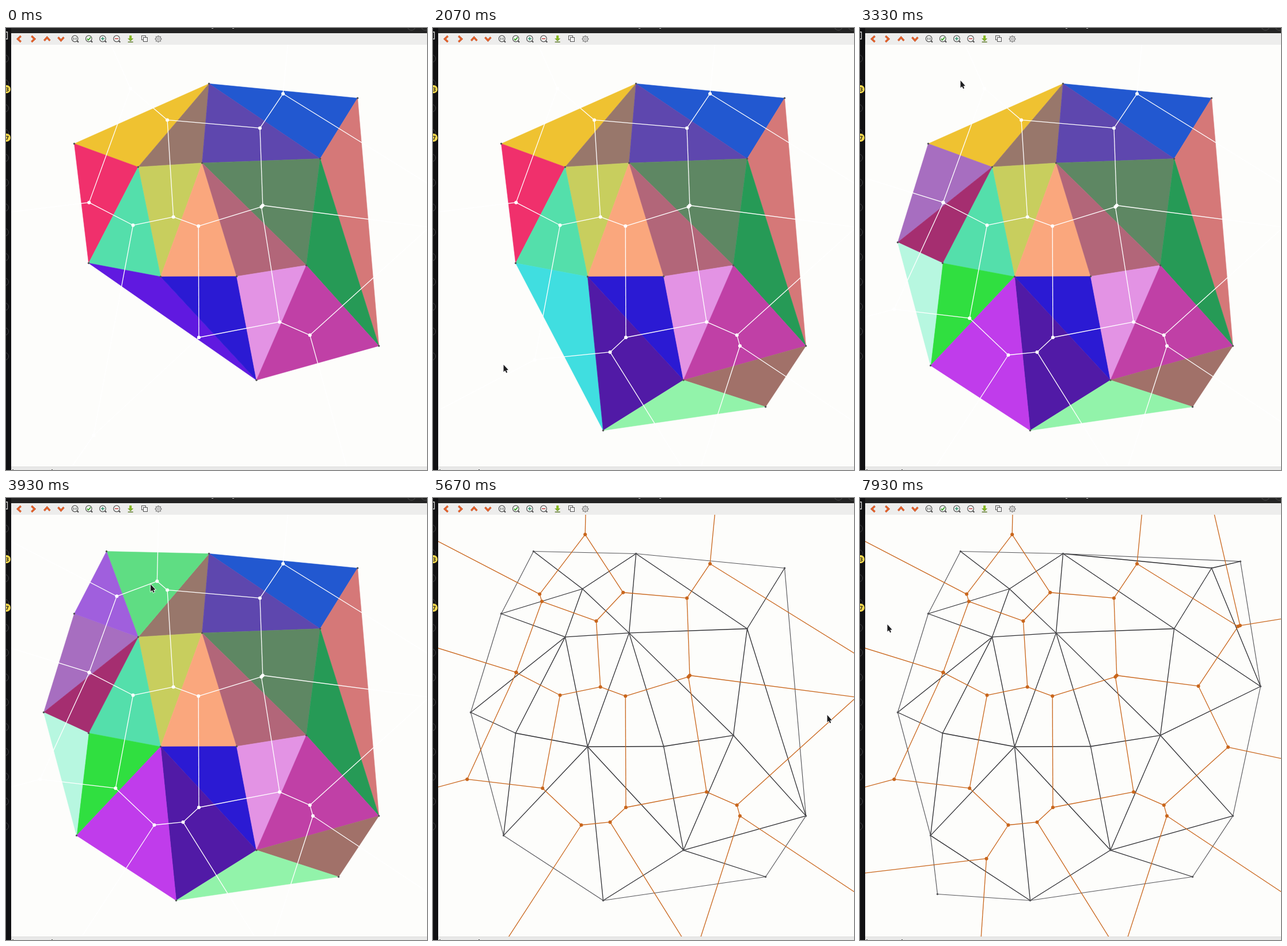
An HTML page with a canvas that plays this animation: 731x766 px, repeating every 8000 ms.

```html
<!DOCTYPE html>
<html lang="en">
<head>
<meta charset="utf-8">
<title>Delaunay and Voronoi</title>
<style>
  html, body { margin: 0; width: 100%; height: 100%; overflow: hidden; background: #fdfdfb; }
  canvas { display: block; }
</style>
</head>
<body>
<canvas id="stage" width="731" height="766"></canvas>
<script>
const ctx = document.getElementById('stage').getContext('2d');
const W = 731, H = 766, LOOP = 8000, TAU = Math.PI * 2;
const VIEW = { x: 9, y: 29, w: 722, h: 731 };
const FIRST = 12, WIRE_AT = 5070, MAX_RADIUS = 1000;

// Sites, named A, B, C... in order of insertion
const sites = [
  [352, 96], [610, 121], [118, 200], [229, 240.4], [340, 233.4], [545, 226], [143, 407],
  [268, 430.5], [400, 430], [521, 410.8], [647, 550.4], [434.4, 609.8], [577, 656], [295, 697],
  [122, 584.4], [65, 371], [174, 92], [259, 157], [695, 326], [660, 109.4], [134, 686]
];

// A click every 700 ms, with a pause for the change of view
const clicks = sites.slice(FIRST).map((site, i) => ({ t: 700 * (i + 1) + (i > 5 ? 1000 : 0), site }));

const stop = (t, x, y) => ({ t, x, y });
const route = [
  stop(0, 640, 800), stop(870, 433, 695), stop(4800, 376, 414), stop(5150, 376, 414),
  stop(5670, 684, 377), stop(7900, 47, 220), stop(LOOP, 47, 220),
  ...clicks.flatMap(({ t, site: [x, y] }) => [stop(t - 180, x, y), stop(t + 60, x, y)])
].sort((a, b) => a.t - b.t);

const fills = {
  ACD: '#efc231', ADE: '#98776b', AEF: '#5e47ae', ABF: '#2258d0', CDG: '#f0306c',
  DGH: '#54dfab', DEH: '#c8ce5e', EHI: '#faa77d', EIJ: '#b26679', EFJ: '#5e8763',
  FJK: '#269a56', BFK: '#d57878', GHL: '#6019e0', HIL: '#2b1ad3', IJL: '#e393e4',
  JKL: '#c040a6', KLM: '#a17169', GHN: '#40dee0', HLN: '#511aa6', LMN: '#92f3aa',
  CDP: '#a76ec0', DGP: '#a52e70', GOP: '#b7f7e0', GHO: '#30df40', HNO: '#c03ceb',
  AQR: '#ed82cb', AER: '#c478dd', DER: '#ce9bcf', CDR: '#96f22e', CQR: '#e6217d'
};

function fillOf(ids) {
  const name = String.fromCharCode(...ids.map(i => 65 + i));
  return fills[name] || `hsl(${(ids[0] * 67 + ids[1] * 131 + ids[2] * 29) % 360} 65% 62%)`;
}

function circumcircle(a, b, c) {
  const bx = b[0] - a[0], by = b[1] - a[1], cx = c[0] - a[0], cy = c[1] - a[1];
  const d = 2 * (bx * cy - by * cx);
  const bb = bx * bx + by * by, cc = cx * cx + cy * cy;
  const x = (cy * bb - by * cc) / d, y = (bx * cc - cx * bb) / d;
  return { x: a[0] + x, y: a[1] + y, r: Math.hypot(x, y) };
}

// Triangles with empty circumcircles, slivers left out, and the edges they share
function triangulate(n) {
  const pts = sites.slice(0, n), tris = [], edges = new Map();
  for (let i = 0; i < n; i++) for (let j = i + 1; j < n; j++) for (let k = j + 1; k < n; k++) {
    const o = circumcircle(pts[i], pts[j], pts[k]);
    if (!(o.r < MAX_RADIUS)) continue;
    const empty = pts.every((p, m) => m === i || m === j || m === k ||
      Math.hypot(p[0] - o.x, p[1] - o.y) >= o.r);
    if (!empty) continue;
    tris.push({ o, pts: [pts[i], pts[j], pts[k]], fill: fillOf([i, j, k]) });
    for (const [a, b, c] of [[i, j, k], [i, k, j], [j, k, i]]) {
      const key = a + '-' + b;
      if (!edges.has(key)) edges.set(key, { a: pts[a], b: pts[b], opp: pts[c], centres: [] });
      edges.get(key).centres.push(o);
    }
  }
  return { pts, tris, edges: [...edges.values()] };
}

const meshes = [];
const meshOf = n => meshes[n] || (meshes[n] = triangulate(n));

function trace(pts) {
  ctx.beginPath();
  pts.forEach(p => ctx.lineTo(p[0], p[1]));
}

function line(color, width, ...pts) {
  ctx.strokeStyle = color;
  ctx.lineWidth = width;
  trace(pts);
  ctx.stroke();
}

function shape(color, ...pts) {
  ctx.fillStyle = color;
  trace(pts);
  ctx.fill();
}

function disc(x, y, r, color) {
  ctx.fillStyle = color;
  ctx.beginPath();
  ctx.arc(x, y, r, 0, TAU);
  ctx.fill();
}

function ring(x, y, r, color, width = 1) {
  ctx.strokeStyle = color;
  ctx.lineWidth = width;
  ctx.beginPath();
  ctx.arc(x, y, r, 0, TAU);
  ctx.stroke();
}

function rect(x, y, w, h, color) {
  ctx.fillStyle = color;
  ctx.fillRect(x, y, w, h);
}

function drawVoronoi({ tris, edges }, color) {
  for (const { a, b, opp, centres: [p, q] } of edges) {
    let end = q && [q.x, q.y];
    if (!end) {
      // Hull edge: a ray pointing away from the inside
      const nx = b[1] - a[1], ny = a[0] - b[0];
      const side = nx * (opp[0] - a[0]) + ny * (opp[1] - a[1]) > 0 ? -1 : 1;
      const len = 3000 * side / Math.hypot(nx, ny);
      end = [p.x + nx * len, p.y + ny * len];
    }
    line(color, 1.3, [p.x, p.y], end);
  }
  tris.forEach(t => disc(t.o.x, t.o.y, 3, color));
}

function drawMesh(mesh, wire) {
  ctx.save();
  ctx.beginPath();
  ctx.rect(VIEW.x, VIEW.y, VIEW.w, VIEW.h);
  ctx.clip();
  ctx.translate(0.5, 0.5); // sites lie on pixel centres
  if (wire) {
    for (const e of mesh.edges) {
      const inner = e.centres.length > 1;
      line(inner ? '#2c2c30' : '#56565a', inner ? 1.3 : 1.15, e.a, e.b);
    }
  } else {
    for (const t of mesh.tris) {
      shape(t.fill, ...t.pts);
      line(t.fill, 0.6, ...t.pts, t.pts[0]);
    }
  }
  mesh.pts.forEach(p => disc(p[0], p[1], 1.7, '#555558'));
  drawVoronoi(mesh, wire ? '#c9661c' : '#fff');
  ctx.restore();
}

function chevron(x, turn) {
  ctx.save();
  ctx.translate(x, 19);
  ctx.rotate(turn * TAU / 4);
  const arms = [[2.8, -5], [-2.6, 0], [2.8, 5]];
  line('#b8401c', 3.2, ...arms);
  line('#ee6a2c', 1.8, ...arms);
  ctx.restore();
}

function magnifier(x, drawMark) {
  ctx.save();
  ctx.translate(x, 18.5);
  line('#4a4a4a', 2, [3.5, 3.5], [6.3, 6.3]);
  disc(0, 0, 5.3, '#f4f6f4');
  ring(0, 0, 5.3, '#555', 1.2);
  drawMark();
  ctx.restore();
}

function oneToOne() {
  for (const x of [-2.3, 2.3]) line('#444', 1, [x, -2], [x, 2.2]);
  for (const y of [-1.3, 0.7]) rect(-0.5, y, 1, 1, '#444');
}

function plus() {
  line('#2f8f6c', 1.5, [-3, 0], [3, 0]);
  line('#2f8f6c', 1.5, [0, -3], [0, 3]);
}

function saveIcon(x) {
  rect(x - 2, 13, 4, 5, '#86b820');
  shape('#86b820', [x - 4.5, 18], [x + 4.5, 18], [x, 22.5]);
  line('#557a16', 0.8, [x - 4.5, 18], [x, 22.5], [x + 4.5, 18]);
  line('#5d7a2a', 1.5, [x - 4.5, 24.3], [x + 4.5, 24.3]);
}

function copyIcon(x) {
  for (const d of [0, 3]) {
    rect(x + d, 13.5 + d, 7, 7, '#f3f3f3');
    ctx.strokeStyle = '#555';
    ctx.lineWidth = 1;
    ctx.strokeRect(x + d, 13.5 + d, 7, 7);
  }
}

function gear(x, y) {
  for (let a = 0; a < TAU; a += TAU / 8) {
    const c = Math.cos(a), s = Math.sin(a);
    line('#858585', 2, [x + c * 4, y + s * 4], [x + c * 6, y + s * 6]);
  }
  ring(x, y, 4.4, '#858585', 1.2);
  ring(x, y, 1.9, '#858585');
}

function drawToolbar() {
  rect(9, 9, 722, 20, '#ededec');
  const slot = i => 23 + 24.15 * i;
  [0, 2, 1, 3].forEach((turn, i) => chevron(slot(i), turn));
  magnifier(slot(4), oneToOne);
  magnifier(slot(5), () => line('#3da32c', 1.8, [-3, 0], [-0.8, 2.4], [3.2, -2.4]));
  magnifier(slot(6), plus);
  magnifier(slot(7), () => line('#c03a38', 1.5, [-3, 0], [3, 0]));
  saveIcon(slot(8));
  copyIcon(235.5);
  gear(slot(10), 19);
}

function badge(y, text) {
  disc(1, y, 7, '#f4d84e');
  ctx.fillStyle = '#3a3520';
  ctx.font = 'bold 9px "DejaVu Sans", sans-serif';
  ctx.fillText(text, -1, y + 3.5);
}

function drawFrame() {
  rect(0, 0, W, 9, '#232323');
  rect(0, 0, 9, H, '#111113');
  for (const x of [357, 393]) rect(x, 0, 3, 1, '#bbb');
  for (const x of [704, 728]) ring(x, -3, 7, '#4a4a4a');
  line('#d8d8d8', 1.3, [0, 7], [2.5, 7], [2.5, 19], [0, 19]);
  for (let y = 53; y < 600; y += 43) ring(-2, y, 6.5, '#414145');
  badge(106, '3');
  badge(190, '7');
  drawToolbar();
}

function drawStatus({ x, y }) {
  rect(9, 760, 722, 6, '#e9e9e8');
  rect(9, 760, 722, 1, '#dcdcdb');
  rect(11, 765, 2, 1, '#555');
  // The read-out is one digit shorter for small coordinates
  const short = x - VIEW.x < 100 || y - VIEW.y < 100;
  rect(short ? 72 : 79, 765, 2, 1, '#444');
}

function mouseAt(t) {
  const i = Math.max(1, route.findIndex(s => s.t >= t));
  const a = route[i - 1], b = route[i];
  const u = (t - a.t) / (b.t - a.t), e = u * u * (3 - 2 * u);
  return { x: a.x + (b.x - a.x) * e, y: a.y + (b.y - a.y) * e };
}

function drawMouse({ x, y }) {
  ctx.save();
  ctx.translate(x + 0.5, y);
  trace([[0, -1], [0, 11.5], [2.7, 9.2], [4.7, 13.3], [6.6, 12.4], [4.8, 8.5], [8.3, 8.2]]);
  ctx.closePath();
  ctx.strokeStyle = '#fff';
  ctx.lineWidth = 1.6;
  ctx.stroke();
  ctx.fillStyle = '#1c1c1e';
  ctx.fill();
  ctx.restore();
}

function draw(t) {
  const mouse = mouseAt(t);
  const count = FIRST + clicks.filter(c => t >= c.t).length;
  rect(0, 0, W, H, '#fdfdfb');
  drawMesh(meshOf(count), t >= WIRE_AT);
  drawFrame();
  drawStatus(mouse);
  drawMouse(mouse);
}

const start = performance.now();
function tick() {
  draw((performance.now() - start) % LOOP);
  requestAnimationFrame(tick);
}
tick();
</script>
</body>
</html>
```
